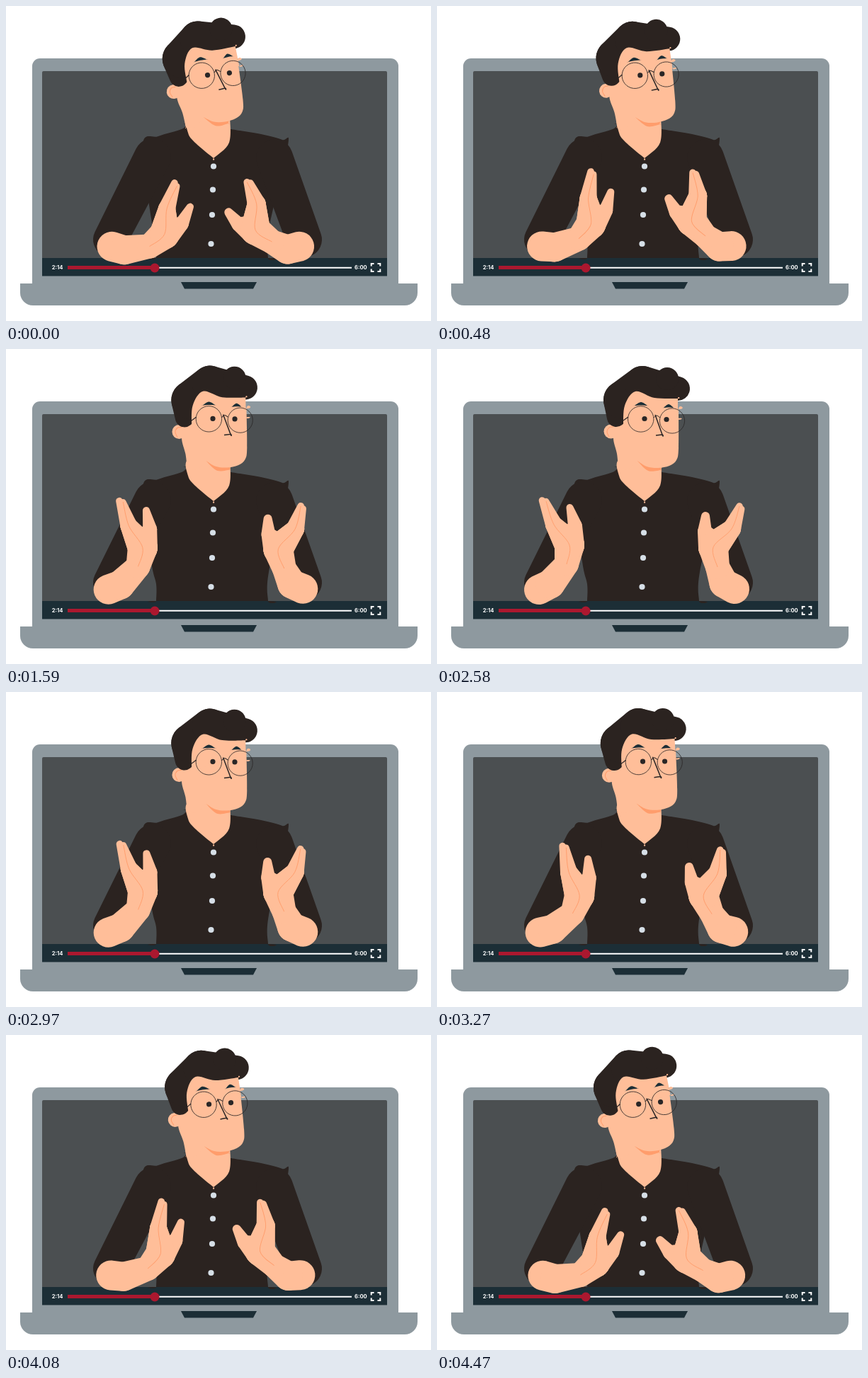
An HTML page with a canvas that plays this animation: 600 px wide and 445 px high, repeating every 4.5 s.

```html
<!DOCTYPE html>
<html lang="en">
<head>
<meta charset="utf-8">
<title>Video lecture</title>
<style>
  html, body { margin: 0; width: 100%; height: 100%; overflow: hidden; background: #fff; }
  canvas { display: block; }
</style>
</head>
<body>
<canvas id="stage" width="600" height="445"></canvas>
<script>
const ctx = document.getElementById('stage').getContext('2d');
const LOOP = 4500;
const C = {
  metal: '#8e999f', screen: '#4b4f51', navy: '#1c2e36', red: '#ab182f', shirt: '#2b2320',
  hair: '#2b2320', skin: '#ffbe99', shade: '#ff9d6c', ink: '#2a2626', button: '#d6dfe7'
};

// Smooth path through the points; a repeated point makes a corner.
function trace(points, closed) {
  const n = points.length;
  const at = i => closed ? points[(i + n) % n] : points[Math.max(0, Math.min(n - 1, i))];
  ctx.beginPath();
  ctx.moveTo(...points[0]);
  for (let i = 0; i < (closed ? n : n - 1); i++) {
    const [a, b, c, d] = [at(i - 1), at(i), at(i + 1), at(i + 2)];
    ctx.bezierCurveTo(
      b[0] + (c[0] - a[0]) / 6, b[1] + (c[1] - a[1]) / 6,
      c[0] - (d[0] - b[0]) / 6, c[1] - (d[1] - b[1]) / 6, c[0], c[1]);
  }
}

function shape(points, color) {
  trace(points, true);
  ctx.fillStyle = color;
  ctx.fill();
}

function line(points, color, width) {
  trace(points, false);
  ctx.strokeStyle = color;
  ctx.lineWidth = width;
  ctx.stroke();
}

// Tapered limb: each neighbouring pair of [x, y, radius] circles is wrapped together.
function limb(color, ...nodes) {
  ctx.fillStyle = color;
  for (let i = 1; i < nodes.length; i++) {
    const [[x1, y1, r1], [x2, y2, r2]] = [nodes[i - 1], nodes[i]];
    const dir = Math.atan2(y2 - y1, x2 - x1);
    const lean = Math.acos((r1 - r2) / Math.hypot(x2 - x1, y2 - y1));
    ctx.beginPath();
    ctx.arc(x1, y1, r1, dir + lean, dir - lean);
    ctx.arc(x2, y2, r2, dir - lean, dir + lean);
    ctx.fill();
  }
}

function rect(x, y, w, h, color, radii = 0) {
  ctx.beginPath();
  ctx.roundRect(x, y, w, h, radii);
  ctx.fillStyle = color;
  ctx.fill();
}

function disc(x, y, r, color) {
  ctx.beginPath();
  ctx.arc(x, y, r, 0, 7);
  ctx.fillStyle = color;
  ctx.fill();
}

function ring(x, y, r) {
  ctx.beginPath();
  ctx.arc(x, y, r, 0, 7);
  ctx.strokeStyle = C.ink;
  ctx.lineWidth = 0.8;
  ctx.stroke();
}

function turned(x, y, degrees, draw) {
  ctx.save();
  ctx.translate(x, y);
  ctx.rotate(degrees * Math.PI / 180);
  ctx.translate(-x, -y);
  draw();
  ctx.restore();
}

function drawLaptop() {
  rect(37, 74, 517, 322, C.metal, [11, 11, 0, 0]);
  rect(20, 392, 561, 31, C.metal, [0, 0, 18, 18]);
  rect(51, 92, 487, 289, C.screen, 2);
  rect(51, 356, 487, 25.5, C.navy);
  ctx.beginPath();
  ctx.moveTo(247, 390);
  ctx.lineTo(354, 390);
  ctx.lineTo(349, 399.5);
  ctx.lineTo(252, 399.5);
  ctx.fill();
}

function drawControls() {
  rect(210, 368.8, 278, 2, '#fff');
  rect(87, 367, 123, 5, C.red);
  disc(210, 370, 6.5, C.red);
  ctx.fillStyle = '#fff';
  ctx.font = '700 7.6px Inter, sans-serif';
  ctx.fillText('2:14', 64.7, 372.4);
  ctx.fillText('6:00', 492, 372);
  ctx.strokeStyle = '#fff';
  ctx.lineWidth = 2;
  ctx.beginPath();
  for (const sx of [-1, 1]) for (const sy of [-1, 1]) {
    ctx.moveTo(522 + sx * 2.5, 369.5 + sy * 5.5);
    ctx.lineTo(522 + sx * 6.3, 369.5 + sy * 5.5);
    ctx.lineTo(522 + sx * 6.3, 369.5 + sy * 2);
  }
  ctx.stroke();
}

function drawTorso() {
  shape([[255, 167], [255, 167], [248, 174], [215, 184], [193, 196], [205, 300], [212, 332], [212, 356], [212, 356],
    [370, 356], [370, 356], [371, 315], [398, 197], [390, 189], [360, 181], [317, 174], [317, 174]], C.shirt);
  limb(C.shirt, [207, 213, 26], [147, 330, 24]);
  limb(C.shirt, [379, 214, 26], [421, 330, 25]);
  shape([[259, 155], [257, 179], [268, 194], [293, 215], [293, 215], [315, 193], [316, 155], [316, 155]], C.skin);
  for (const [x, y] of [[293, 226.5], [292, 259.5], [291, 295], [289.5, 336]]) disc(x, y, 4.1, C.button);
}

function drawHair() {
  limb(C.hair, [253, 97, 13], [262, 72, 27], [290, 49, 25], [340, 56, 17]);
  disc(325, 42, 16, C.hair);
  shape([[263, 109], [263, 109], [265, 80], [280, 60], [307, 69], [340, 70], [340, 70], [340, 98], [340, 98]], C.skin);
  for (const [x, y, w] of [[288, 80, 9], [327, 83, 7]]) {
    shape([[x - w, y], [x - w, y], [x, y - 5], [x + w, y], [x + w, y], [x, y - 0.5]], C.navy);
  }
}

function drawHead(fold) {
  shape([[282, 157], [282, 157], [298, 172], [316, 171], [316, 171], [316, 160]], C.shade);
  disc(245.5, 116.5, 10, C.skin);
  shape([[263, 85], [341, 85], [341, 85], [341, 140], [338, 157], [328, 165], [312, 168], [296, 166], [283, 158],
    [283, 158], [270, 170], [256, 169], [256, 169], [254, 148], [249, 125], [255, 100]], C.skin);
  line([[249, 110], [243, 111], [240, 117], [243, 124]], C.shade, 1);
  turned(260, 65, -4 * fold, drawHair);
  for (const [x, y] of [[293, 98.5], [324, 99.5]]) disc(x + 3 * fold, y + fold, 3.6, C.ink);
  ring(287.7, 99, 18.2);
  ring(332, 101.5, 17.6);
  line([[306, 97], [310, 94], [315, 97]], C.ink, 1);
  line([[270, 96], [263, 101]], C.ink, 1.2);
  line([[308, 93], [318, 121], [318, 121], [309, 122]], C.ink, 1.5);
}

function drawArm({ elbow, forearm, wrist, palm, knuckle, tips, thumb }) {
  limb(C.skin, elbow, forearm, wrist, palm, ...thumb);
  for (const tip of tips) limb(C.skin, palm, knuckle, tip);
  line([tips[1], knuckle, palm, wrist], C.shade, 0.9);
}

const leftArm = {
  elbow: [144, 340, 21], forearm: [160, 332, 20.5], wrist: [183, 304, 17], palm: [187, 277, 21],
  knuckle: [165, 248, 12], tips: [[148.5, 214, 4.8], [154, 215, 4.2]], thumb: [[195, 250, 10], [187.5, 224, 5]]
};
const rightArm = {
  elbow: [420, 339, 21], forearm: [405, 331, 20.5], wrist: [396, 308, 17], palm: [390, 280, 21],
  knuckle: [416, 254, 13], tips: [[430, 226, 4.4], [427, 222, 4.8]], thumb: [[378, 258, 10], [379, 236, 6]]
};

// 0 = hands together, 1 = hands apart
function openness(t) {
  return Math.max(0, Math.min(1, t / 1800, (LOOP - t) / 1740));
}

function render() {
  const fold = 1 - openness(performance.now() % LOOP);
  ctx.clearRect(0, 0, 600, 445);
  drawLaptop();
  drawControls();
  drawTorso();
  turned(276, 186, -7.5 * fold, () => drawHead(fold));
  turned(147, 347, 42.5 * fold, () => drawArm(leftArm));
  turned(418, 347, -42.5 * fold, () => drawArm(rightArm));
  requestAnimationFrame(render);
}
render();
</script>
</body>
</html>
```
